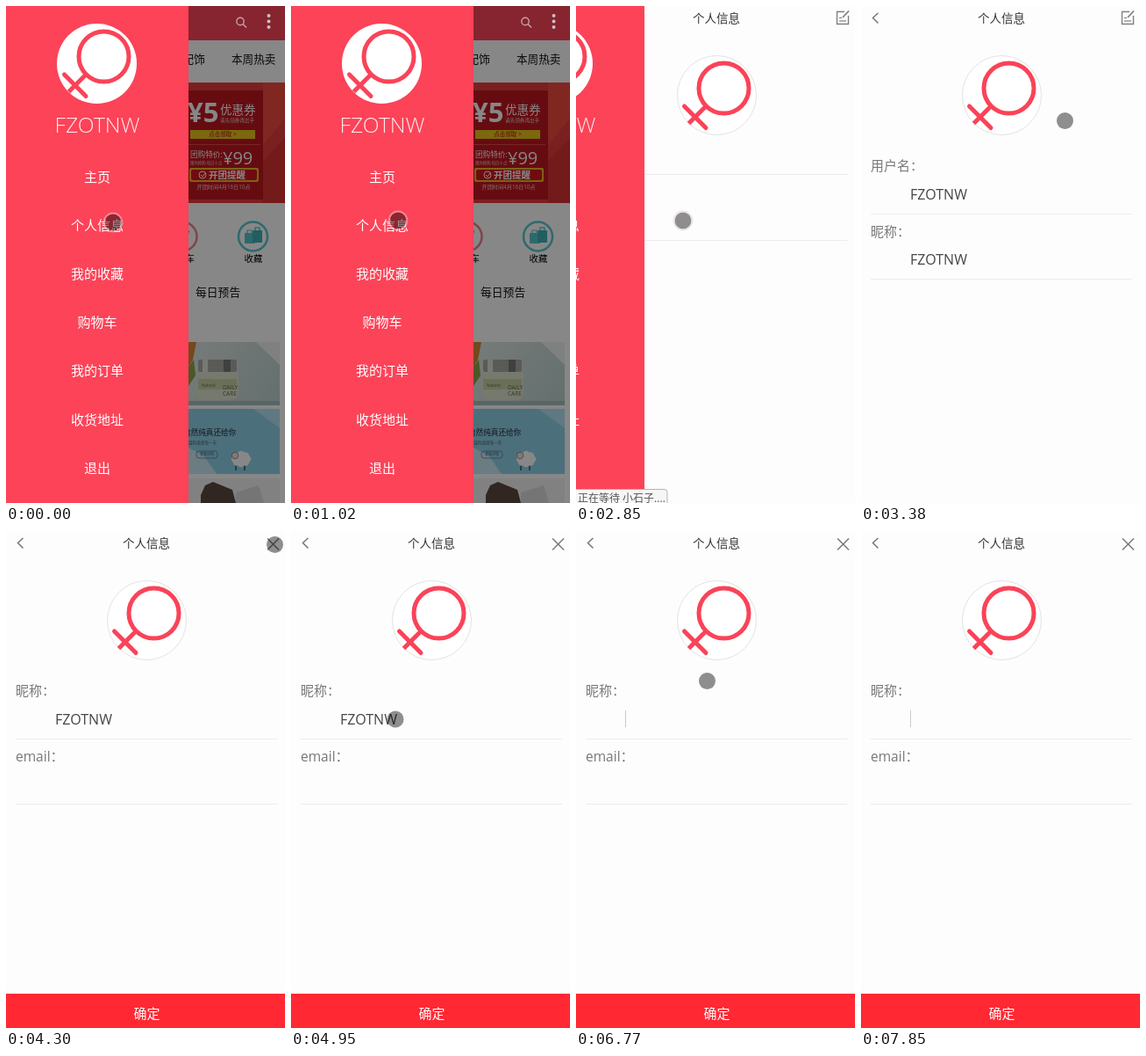
Write an HTML page with a canvas that moves like this. It is 318 px wide and 565 px high and loops after 7.99 s.

```html
<!DOCTYPE html>
<html lang="zh">
<head>
<meta charset="utf-8">
<title>个人信息</title>
<style>
html, body { margin: 0; width: 100%; height: 100%; overflow: hidden; background: #fdfdfd; }
canvas { display: block; width: 318px; height: 565px; }
</style>
</head>
<body>
<canvas id="stage"></canvas>
<script>
const W = 318, H = 565, LOOP = 7990;
const RED = '#fc4358', NAME = 'FZOTNW';
const FONT = '"Open Sans", "Noto Sans CJK SC", "Noto Sans CJK", sans-serif';
const MENU = ['主页', '个人信息', '我的收藏', '购物车', '我的订单', '收货地址', '退出'];

// Each row: start time, then the values held until the next row.
const CURSOR = [
  [0, 122, 246], [870, 122, 245], [1020, 122, 244],
  [3000, 125, 241], [3130, 148, 217], [3260, 188, 178], [3380, 232.5, 130.5],
  [3510, 272, 65], [3630, 295, 18], [3770, 301, 16], [3900, 306, 15], [4030, 306.5, 15.5],
  [4430, 291, 38], [4560, 236, 105], [4690, 172, 170], [4820, 130, 207], [4950, 119, 214],
  [5360, 123, 214], [5500, 153, 204], [5650, 149.5, 170.5]
];
const DRAWER = [[0, 0], [2700, -20], [2850, -130], [3000, -198], [3130, -220]];
// Letters left in the field and whether the caret shows.
const TYPING = [
  [0, 6, 0], [5210, 6, 1], [5650, 6, 0], [6060, 5, 0], [6220, 4, 1], [6350, 3, 1],
  [6490, 2, 1], [6620, 2, 0], [6770, 0, 1], [7290, 0, 0], [7850, 0, 1]
];

const canvas = document.getElementById('stage');
const c = canvas.getContext('2d');
const dpr = window.devicePixelRatio || 1;
canvas.width = W * dpr;
canvas.height = H * dpr;

const at = (track, t) => track.reduce((hit, row) => row[0] <= t ? row : hit).slice(1);

function rect(x, y, w, h, color) {
  c.fillStyle = color;
  c.fillRect(x, y, w, h);
}

function round(x, y, w, h, r, color) {
  c.beginPath();
  c.roundRect(x, y, w, h, r);
  c.fillStyle = color;
  c.fill();
}

function disc(x, y, r, color) {
  c.beginPath();
  c.arc(x, y, r, 0, 7);
  c.fillStyle = color;
  c.fill();
}

function ring(x, y, r, color, width) {
  c.beginPath();
  c.arc(x, y, r, 0, 7);
  c.strokeStyle = color;
  c.lineWidth = width;
  c.stroke();
}

function path(points, color, width, cap = 'butt') {
  c.beginPath();
  for (let i = 0; i < points.length; i += 2) c.lineTo(points[i], points[i + 1]);
  c.strokeStyle = color;
  c.lineWidth = width;
  c.lineCap = cap;
  c.stroke();
}

function poly(points, color) {
  c.beginPath();
  for (let i = 0; i < points.length; i += 2) c.lineTo(points[i], points[i + 1]);
  c.fillStyle = color;
  c.fill();
}

// y is the visual middle of the line
function text(str, x, y, size, color, align = 'left', weight = 400) {
  c.font = `${weight} ${size}px ${FONT}`;
  c.textAlign = align;
  c.fillStyle = color;
  c.fillText(str, x, y + size * 0.37);
}

function avatar(x, y, border) {
  disc(x, y, 45.5, '#fff');
  if (border) ring(x, y, 45, '#e2e2e2', 1);
  ring(x + 8, y - 8, 28.5, '#fa4358', 5);
  path([x - 12, y + 12, x - 32, y + 32], '#fa4358', 5);
  path([x - 37, y + 12.5, x - 12.5, y + 37], '#fa4358', 5, 'round');
}

function coupon() {
  rect(208, 87, 110, 137, '#e63c3c');
  poly([293, 87, 318, 87, 318, 128, 293, 158], '#f04a40');
  poly([293, 176, 318, 150, 318, 224, 293, 224], '#d83032');
  rect(208, 96, 85, 124, '#c01720');
  text('¥5', 207, 121, 31, '#fff', 'left', 700);
  text('优惠券', 244, 118, 13.5, '#fff');
  text('请先领券再出手', 244, 130, 5.6, '#f3cfcf');
  rect(210, 141, 74, 10, '#e8c31c');
  text('点击领取 >', 247, 146, 6.5, '#a01018', 'center');
  path([208, 157.5, 290, 157.5], '#e0474c', 1);
  text('团购特价:', 210, 169, 8.6, '#fff');
  text('限时抢购 每日十点', 210, 178.5, 4.4, '#f3cfcf');
  text('¥99', 247, 173, 20, '#fff');
  round(209, 184, 79, 16, 2, '#efb52c');
  round(211, 186, 75, 12, 2, '#d3141c');
  ring(224, 192, 4, '#fff', 1);
  path([222, 192, 224, 194, 227, 190], '#fff', 1);
  text('开团提醒', 231, 192, 10.5, '#fff', 'left', 700);
  text('开团时间4月16日10点', 248, 206, 6.2, '#f6d4d4', 'center');
}

function jarPhoto() {
  const bg = c.createLinearGradient(208, 382, 312, 454);
  bg.addColorStop(0, '#dfe8e4');
  bg.addColorStop(1, '#bcd2cf');
  rect(208, 382, 104, 72, bg);
  poly([208, 382, 217, 382, 213, 402, 208, 410], '#d98a36');
  poly([208, 410, 214, 402, 216, 420, 208, 432], '#8fa34d');
  poly([285, 382, 312, 382, 312, 408], '#eef3f0');
  round(217, 412, 48, 36, 8, '#dfe4cf');
  rect(219, 424, 44, 12, '#c6d3a4');
  round(219, 402, 44, 14, 2, '#a9aaa4');
  rect(224, 402, 6, 14, '#e2e2dc');
  rect(248, 402, 8, 14, '#777a76');
  text('DAILY', 247, 434, 6.5, '#5f6b4c');
  text('CARE', 247, 441, 6.5, '#5f6b4c');
  text('Natural', 223, 431, 4.5, '#5f6b4c');
  rect(208, 449, 104, 5, '#a8bfbd');
}

function sheepCard() {
  rect(208, 458, 104, 74, '#8fd0ea');
  poly([282, 458, 312, 458, 312, 480], '#b4e1f2');
  poly([208, 502, 226, 512, 240, 532, 208, 532], '#c9e9f4');
  text('自然纯真还给你', 202, 485, 8.6, '#202c33');
  text('温和滋润每一天', 208, 496, 4.6, '#46616d');
  c.beginPath();
  c.roundRect(217, 506, 24, 8, 3);
  c.strokeStyle = '#4f7482';
  c.lineWidth = 0.7;
  c.stroke();
  text('查看详情', 229, 510, 4, '#46616d', 'center');
  path([262, 522, 262, 528], '#333', 1.2);
  path([272, 522, 272, 528], '#333', 1.2);
  for (let i = 0; i < 8; i++) {
    const a = i * Math.PI / 4;
    disc(268 + 7 * Math.cos(a), 515 + 5 * Math.sin(a), 4.2, '#fff');
  }
  disc(268, 515, 7, '#fff');
  disc(261, 511, 3.8, '#efe6dc');
  ring(261, 511, 3.8, '#555', 0.6);
}

function home() {
  rect(208, 0, 110, H, '#fff');
  rect(208, 0, 110, 39, RED);
  text('配饰', 227, 60, 13, '#111', 'right');
  text('本周热卖', 257, 60, 12.6, '#111');
  coupon();

  ring(201, 262, 16.5, '#f0808c', 2.5);
  path([196, 256, 208, 256, 206, 264, 198, 264], '#f0808c', 2);
  text('购物车', 215, 287, 10.4, '#000', 'right');
  ring(281.5, 262, 16.5, '#55c5cc', 2.5);
  round(272, 258, 12, 12, 1, '#55c5cc');
  round(281, 255, 11, 14, 1, '#3fb0b8');
  path([275, 258, 275, 255, 280, 255, 280, 258], '#55c5cc', 1.2);
  path([284, 255, 284, 252, 289, 252, 289, 255], '#3fb0b8', 1.2);
  text('收藏', 282, 287, 10.4, '#000', 'center');
  text('每日预告', 216, 325, 12.8, '#111');

  jarPhoto();
  sheepCard();

  rect(208, 537, 104, 28, '#f2f2f2');
  poly([222, 556, 227, 545, 236, 541, 258, 550, 262, 565, 222, 565], '#5a4740');
  poly([262, 553, 288, 545, 294, 565, 262, 565], '#dcdcdc');

  rect(208, 0, 110, H, 'rgba(0,0,0,.47)');
  ring(267, 17.5, 4.2, '#c3a2a7', 1.4);
  path([270, 20.5, 274, 24.5], '#c3a2a7', 1.6);
  for (const y of [11, 17.5, 24]) disc(299.5, y, 2, '#cdc0c2');
}

function drawer(dx) {
  c.save();
  c.translate(dx, 0);
  rect(0, 0, 208, H, RED);
  avatar(103.5, 65.5, false);
  text(NAME, 104, 135, 24.6, '#ffe9ec', 'center', 300);
  MENU.forEach((label, i) => text(label, 104, 194 + i * 55.2, 15, '#fff', 'center'));
  c.restore();
}

function editIcon() {
  path([306, 6.5, 297.5, 6.5, 297.5, 20.5, 310.5, 20.5, 310.5, 11], '#808080', 1.4);
  path([304, 13, 311, 5.5], '#808080', 1.8);
  path([300, 13.5, 303, 13.5], '#808080', 1.2);
  path([300, 17, 308, 17], '#808080', 1.2);
}

function fieldLine(y) {
  rect(11, y, 298, 1, '#ececec');
}

function pageTop() {
  rect(0, 0, W, H, '#fdfdfd');
  path([19.5, 8, 13.5, 13.5, 19.5, 19.5], '#777', 1.5);
  text('个人信息', 160, 14, 13.5, '#333', 'center');
  avatar(160.5, 101.5, true);
}

function profile(loaded) {
  pageTop();
  editIcon();
  text('用户名：', 11, 181, 15, '#777');
  text('昵称：', 11, 256, 15, '#777');
  fieldLine(loaded ? 236 : 191);
  fieldLine(loaded ? 310 : 266);
  if (!loaded) return;
  text(NAME, 56, 214.5, 16, '#444');
  text(NAME, 56, 288.5, 16, '#444');
}

function editor(t) {
  const [count, caret] = at(TYPING, t);
  const left = NAME.slice(0, count);
  pageTop();
  path([298, 8.5, 311, 21.5], '#777', 1.4);
  path([311, 8.5, 298, 21.5], '#777', 1.4);
  text('昵称：', 11, 181, 15, '#777');
  text('email：', 11, 256, 15.5, '#777');
  text(left, 56, 214.5, 16, '#444');
  if (caret) rect(56 + Math.round(c.measureText(left).width), 204, 1, 19, count ? '#666' : '#c8c8c8');
  fieldLine(236);
  fieldLine(310);
  rect(0, 526, W, 39, '#ff2833');
  text('确定', 160.5, 548.5, 15, '#fff', 'center', 500);
}

function statusTip() {
  c.beginPath();
  c.roundRect(-4, 549.5, 108, 24, 3);
  c.fillStyle = '#f6f6f6';
  c.fill();
  c.strokeStyle = '#b5b5b5';
  c.lineWidth = 1;
  c.stroke();
  text('正在等待 小石子....', 2, 559.5, 12, '#555');
}

function pointer(t) {
  if (t >= 7580) return;
  const [x, y] = at(CURSOR, t);
  disc(x, y, 9.5, 'rgba(0,0,0,.44)');
  if (t < 3000) ring(x, y, 10.4, 'rgba(225,205,205,.5)', 2);
}

function draw(now) {
  const t = now % LOOP;
  c.setTransform(dpr, 0, 0, dpr, 0, 0);
  if (t < 2700) home();
  else if (t < 4300) profile(t >= 3000);
  else editor(t);
  const [dx] = at(DRAWER, t);
  if (dx > -208) drawer(dx);
  if (t >= 2700 && t < 3130) statusTip();
  pointer(t);
}

const start = performance.now();
function tick() {
  draw(performance.now() - start);
  requestAnimationFrame(tick);
}
tick();
</script>
</body>
</html>
```
